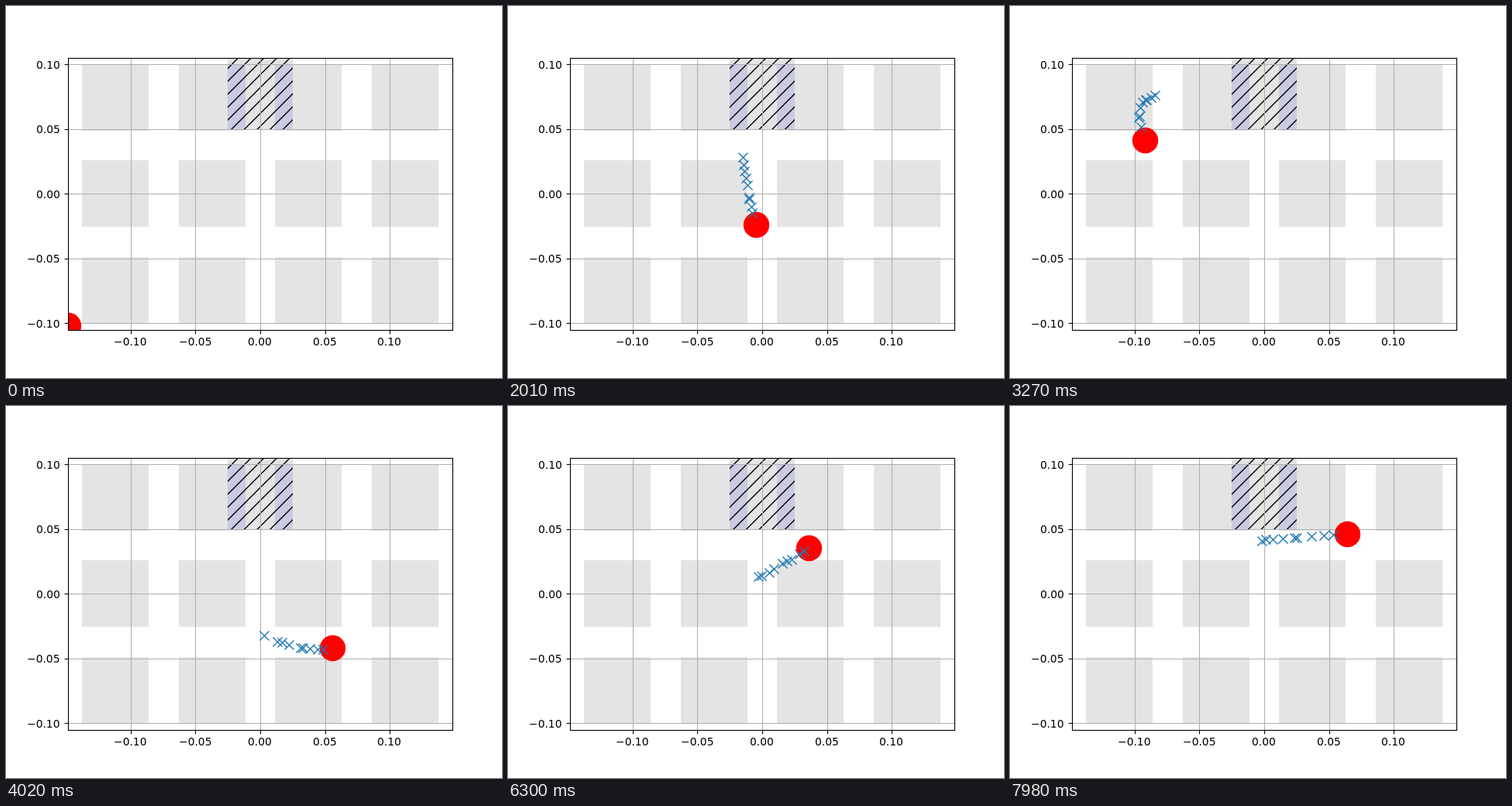
Write an HTML page with a canvas that moves like this. It is 640x480 px and loops after 8 s.

```html
<!DOCTYPE html>
<html lang="en">
<head>
<meta charset="utf-8">
<title>Ball tracking</title>
<style>
  html, body { margin: 0; width: 100%; height: 100%; overflow: hidden; background: #fff; }
  canvas { display: block; }
</style>
</head>
<body>
<canvas id="plot" width="640" height="480"></canvas>
<script>
const ctx = document.getElementById('plot').getContext('2d');
const LOOP = 8000, STEP = 30;
const SCALE = 496 / 0.297;
const BOX = { left: 80.5, top: 67.5, right: 576.5, bottom: 418.5 };
const LINE = 1.11;
const TICKS = [-0.1, -0.05, 0, 0.05, 0.1];

const toX = v => 328 + v * SCALE;
const toY = v => 242.4 - v * SCALE;
const snap = v => Math.floor(v + 0.5) + 0.5;

// The ball waits in the corner, then rolls through these turns: step, x, y
const CORNER = [80, 412];
const TURNS = [
  [1, 334, 266], [30, 320, 272], [43, 290, 216], [51, 296, 172],
  [67, 320, 282], [77, 344, 312], [99, 186, 116], [104, 168, 131],
  [109, 174, 173], [124, 339, 299], [134, 421, 312], [139, 447, 297],
  [153, 396, 262], [163, 306, 226], [173, 211, 219], [180, 196, 231],
  [187, 220, 251], [200, 322, 221], [210, 388, 183], [215, 398, 175],
  [230, 253, 174], [238, 187, 200], [256, 321, 174], [266, 435, 165]
];

function slope(i, axis) {
  const rate = j => (TURNS[j + 1][axis] - TURNS[j][axis]) / (TURNS[j + 1][0] - TURNS[j][0]);
  if (i === 0) return rate(0);
  if (i === TURNS.length - 1) return rate(i - 1);
  const before = TURNS[i][0] - TURNS[i - 1][0];
  const after = TURNS[i + 1][0] - TURNS[i][0];
  return (rate(i - 1) * after + rate(i) * before) / (before + after);
}

// Cubic Hermite interpolation between the turns
function position(step) {
  if (step < 1) return CORNER;
  let i = 0;
  while (i < TURNS.length - 2 && TURNS[i + 1][0] <= step) i++;
  const a = TURNS[i], b = TURNS[i + 1], span = b[0] - a[0];
  const u = (step - a[0]) / span, v = 1 - u;
  return [1, 2].map(axis =>
    (1 + 2 * u) * v * v * a[axis] + u * v * v * span * slope(i, axis) +
    u * u * (3 - 2 * u) * b[axis] - u * u * v * span * slope(i + 1, axis));
}

// Repeatable noise in -1..1
function noise(seed) {
  const s = Math.sin(seed * 12.9898) * 43758.5453;
  return 2 * (s - Math.floor(s)) - 1;
}

// A measured position comes slightly early or late and a little off the path
function measurement(step) {
  const [x, y] = position(Math.max(1, step + 0.5 * noise(step)));
  return [Math.round(x + noise(step + 300)) + 0.5, Math.round(y + noise(step + 600)) + 0.5];
}

function line(x1, y1, x2, y2) {
  ctx.beginPath();
  ctx.moveTo(x1, y1);
  ctx.lineTo(x2, y2);
  ctx.stroke();
}

function stroke(color, width) {
  ctx.strokeStyle = color;
  ctx.lineWidth = width;
}

function clipTo(left, top, right, bottom) {
  ctx.beginPath();
  ctx.rect(left, top, right - left, bottom - top);
  ctx.clip();
}

function drawTiles(color) {
  ctx.fillStyle = color;
  for (let col = 0; col < 4; col++)
    for (let row = 0; row < 3; row++)
      ctx.fillRect(Math.floor(98.5 + 124.5 * col), Math.floor(75 + 124.5 * row), 86, 86);
}

function drawHatch() {
  ctx.save();
  clipTo(286, 67, 370, 159);
  ctx.fillStyle = '#e4e4e4';
  ctx.fillRect(286, 67, 84, 92);
  drawTiles('#cacae2');
  stroke('#000', 1.39);
  for (let k = 20; k < 33; k++) {
    const sum = k * 100 / 6;
    line(sum - 170, 170, sum - 60, 60);
  }
  ctx.restore();
}

function drawGrid() {
  stroke('#b0b0b0', LINE);
  for (const v of TICKS) {
    line(snap(toX(v)), BOX.top, snap(toX(v)), BOX.bottom);
    line(BOX.left, snap(toY(v)), BOX.right, snap(toY(v)));
  }
}

function drawCross(x, y) {
  const r = 5.56;
  line(x - r, y - r, x + r, y + r);
  line(x - r, y + r, x + r, y - r);
}

function drawMotion(step) {
  ctx.save();
  clipTo(BOX.left, BOX.top, BOX.right, BOX.bottom);
  const [x, y] = position(step);
  ctx.fillStyle = '#f00';
  ctx.beginPath();
  ctx.arc(x + 0.5, y + 0.5, 16.7, 0, 2 * Math.PI);
  ctx.fill();

  stroke('#1f77b4', 1.39);
  ctx.lineCap = 'square';
  for (let lag = 10; lag >= 2; lag--)
    if (step > lag) drawCross(...measurement(step - lag));
  ctx.restore();
}

function drawAxes() {
  stroke('#000', LINE);
  ctx.strokeRect(BOX.left, BOX.top, BOX.right - BOX.left, BOX.bottom - BOX.top);
  ctx.fillStyle = '#000';
  ctx.font = '13.89px "DejaVu Sans", sans-serif';
  for (const v of TICKS) {
    const x = toX(v), y = toY(v);
    const label = (v < 0 ? '\u2212' : '') + Math.abs(v).toFixed(2);
    const width = ctx.measureText(label).width;
    line(snap(x), BOX.bottom, snap(x), BOX.bottom + 4.86);
    line(BOX.left, snap(y), BOX.left - 4.86, snap(y));
    ctx.fillText(label, Math.floor(x - width / 2), 438);
    ctx.fillText(label, Math.floor(70.3 - width), Math.round(y + 5.3));
  }
}

function draw() {
  const step = Math.floor((performance.now() % LOOP) / STEP);
  ctx.fillStyle = '#fff';
  ctx.fillRect(0, 0, 640, 480);
  drawTiles('#e4e4e4');
  drawHatch();
  drawGrid();
  drawMotion(step);
  drawAxes();
  requestAnimationFrame(draw);
}
draw();
</script>
</body>
</html>
```
